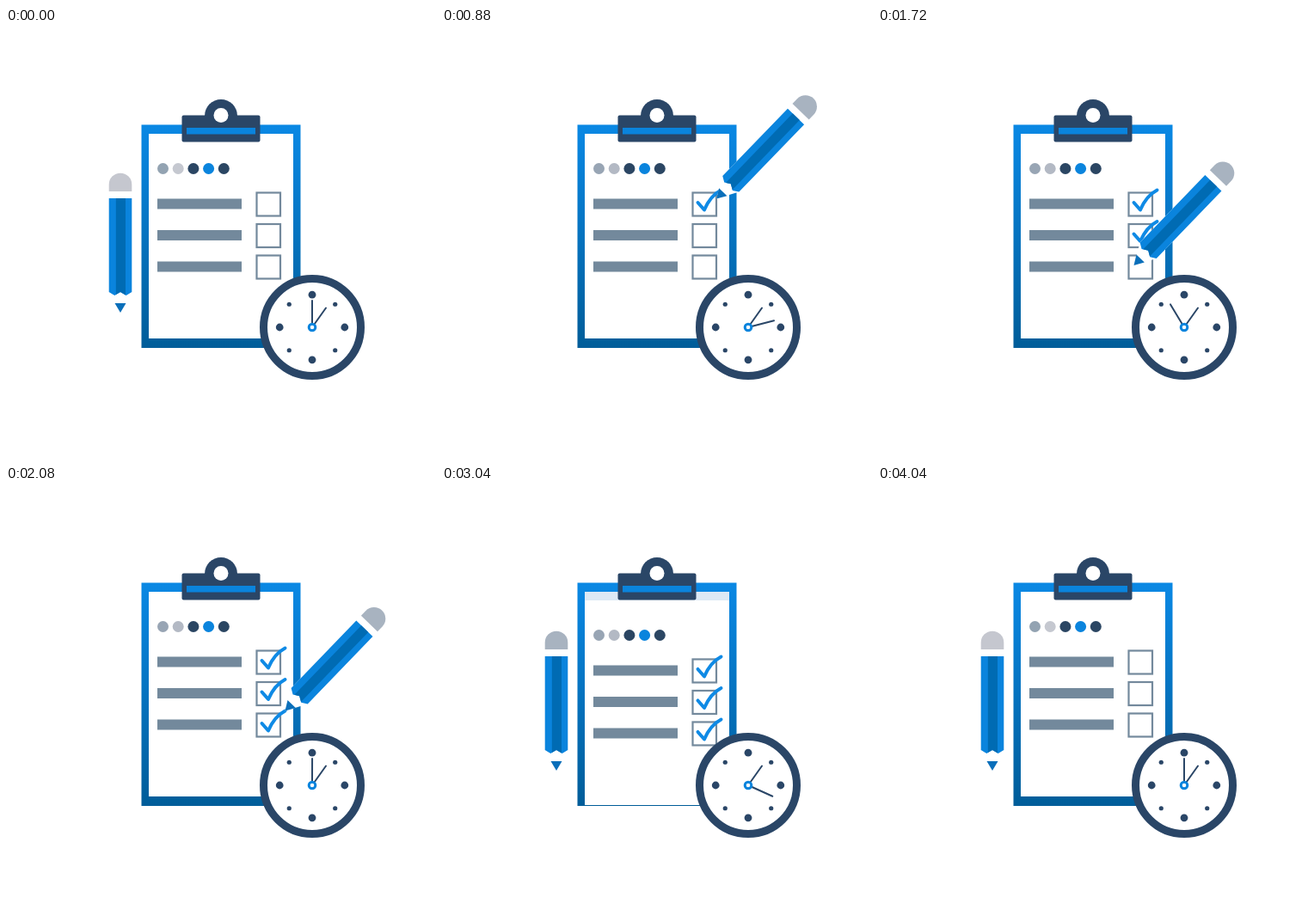
Recreate the animation shown at these times as an HTML page. Size 500 by 500 pixels, loop 5 s.

```html
<!DOCTYPE html>
<html lang="en">
<head>
<meta charset="utf-8">
<title>Checklist</title>
<style>
  html, body { margin: 0; width: 100%; height: 100%; overflow: hidden; background: #fff; }
  svg { display: block; width: 100vw; height: 100vh; }
</style>
</head>
<body>
<svg viewBox="0 0 500 500">
  <defs>
    <linearGradient id="boardFill" x1="0" y1="0" x2="0" y2="1">
      <stop offset="0" stop-color="#0a88e4"/>
      <stop offset=".2" stop-color="#0880d6"/>
      <stop offset="1" stop-color="#005d99"/>
    </linearGradient>
    <clipPath id="boardClip"><path d="M157 112H343V371H157Z"/></clipPath>
  </defs>

  <path d="M157.5 112.5H342.5V372H157.5Z" fill="url(#boardFill)"/>
  <path d="M166 123H334V361H166Z" fill="#dce9f5"/>
  <g clip-path="url(#boardClip)">
    <g id="freshPage"></g>
    <g id="page"></g>
  </g>

  <g fill="#2a4667">
    <circle cx="250" cy="102" r="19"/>
    <rect x="204.5" y="101.5" width="91" height="31" rx="2"/>
    <path d="M210 116H290V123.5H210Z" fill="#0a84dd"/>
    <circle cx="250" cy="101.5" r="8.5" fill="#fff"/>
  </g>

  <g id="clock" transform="translate(356 348)">
    <circle r="56.5" fill="#fff" stroke="#2a4667" stroke-width="9"/>
    <g id="marks" fill="#2a4667"></g>
    <g stroke="#2a4667" stroke-width="2" stroke-linecap="round">
      <path d="M0 0L16 -22.5"/>
      <path id="minute" d="M0 0V-31"/>
    </g>
    <circle r="3.8" fill="#fff" stroke="#0a84dd" stroke-width="3"/>
  </g>

  <!-- the pencil's origin is its point -->
  <g id="pencil">
    <path d="M-13.3 -141H13.3V-24L0 0L-13.3 -24Z" fill="#fff"/>
    <path id="eraser" d="M-13.3 -141V-149A13.3 13.3 0 0 1 13.3 -149V-141Z"/>
    <path d="M-13.3 -133H13.3V-24L6.7 -20L0 -24L-6.7 -20L-13.3 -24Z" fill="#0a84dd"/>
    <path d="M-5.2 -133H6V-20.5L0 -24L-5.2 -21Z" fill="#006bb3"/>
    <path d="M-6.5 -11H6.5L0 0Z" fill="#0a6fba"/>
  </g>
</svg>
<script>
const LOOP = 5000, STEP = 40, PITCH = 36.5, TILT = 44;
const REST = { x: 133, y: 331, tilt: 0 };
const WRITING = [[480, 800], [1080, 1400], [1720, 2040]];
const COLORS = {
  pale: { eraser: '#c5c7cf', dots: ['#93a3b2', '#c5c8d0', '#2b4663', '#0a84dd', '#2b4663'] },
  gray: { eraser: '#a8b3c0', dots: ['#98a5b4', '#b3b9c4', '#2b4663', '#0a84dd', '#2b4663'] },
  warm: { eraser: '#f8ad33', dots: ['#98aa85', '#f5b032', '#ee5f57', '#0a84dd', '#2b4663'] }
};

const $ = id => document.getElementById(id);
const clamp = v => Math.min(1, Math.max(0, v));
const span = (t, from, to) => clamp((t - from) / (to - from));
const smooth = p => p * p * (3 - 2 * p);
const mix = (a, b, p) => a + (b - a) * p;

// Bezier easing (.62, 0, .66, 1), solved by bisection.
function swing(p) {
  let low = 0, high = 1;
  for (let i = 0; i < 20; i++) {
    const u = (low + high) / 2, v = 1 - u;
    const x = 1.86 * u * v * v + 1.98 * u * u * v + u * u * u;
    if (x < p) low = u; else high = u;
  }
  return p <= 0 ? 0 : p >= 1 ? 1 : smooth(low);
}

function pageMarkup(checked) {
  let out = '<path d="M166 123H334V361H166Z" fill="#fff"/>';
  for (let i = 0; i < 5; i++) out += `<circle class="dot" cx="${182.5 + i * 17.7}" cy="163.5" r="6.5"/>`;
  for (let i = 0; i < 3; i++) {
    out += `<g transform="translate(0 ${i * PITCH})">
      <path d="M176 198.5H274V210.5H176Z" fill="#73899c"/>
      <rect x="291.5" y="191.5" width="27.5" height="27" fill="none" stroke="#73899c" stroke-width="2.2"/>
      ${checked ? '<path class="check" d="M297.5 203L305 211.5Q312 195 324.5 188.5" fill="none" stroke="#0f8ae5" stroke-width="4" stroke-linecap="round" stroke-linejoin="round"/>' : ''}
    </g>`;
  }
  return out;
}

$('freshPage').innerHTML = pageMarkup(false);
$('page').innerHTML = pageMarkup(true);
for (let i = 0; i < 8; i++) {
  const a = i * Math.PI / 4, big = i % 2 === 0;
  $('marks').innerHTML += `<circle cx="${37.8 * Math.cos(a)}" cy="${37.8 * Math.sin(a)}" r="${big ? 4.4 : 2.6}"/>`;
}
const checks = [...document.querySelectorAll('.check')];
const dots = [...document.querySelectorAll('.dot')];
const checkLength = checks[0].getTotalLength();

function onCheck(row, p) {
  const pt = checks[0].getPointAtLength(checkLength * p);
  return { x: pt.x, y: pt.y + row * PITCH, tilt: TILT };
}

function between(a, b, p) {
  return { x: mix(a.x, b.x, p), y: mix(a.y, b.y, p), tilt: mix(a.tilt, b.tilt, p) };
}

function pencilPose(t) {
  if (t < WRITING[0][0]) return between(REST, onCheck(0, 0), smooth(span(t, 40, 440)));
  for (let row = 0; row < 3; row++) {
    const [start, end] = WRITING[row];
    if (t < start) return between(onCheck(row - 1, 1), onCheck(row, 0), smooth(span(t, WRITING[row - 1][1], start)));
    if (t < end) return onCheck(row, smooth(span(t, start, end)));
  }
  return between(onCheck(2, 1), REST, smooth(span(t, 2240, 2760)));
}

function palette(t) {
  if (t >= 120 && t < 600) return COLORS.warm;
  return t >= 600 && t < 3360 ? COLORS.gray : COLORS.pale;
}

function draw(t) {
  const turn = t < 2040 ? span(t, 40, 2040) : span(t, 2040, 4040);
  $('minute').setAttribute('transform', `rotate(${360 * swing(turn)})`);

  const pose = pencilPose(t);
  $('pencil').setAttribute('transform', `translate(${pose.x} ${pose.y}) rotate(${pose.tilt})`);

  checks.forEach((check, row) => {
    const p = smooth(span(t, ...WRITING[row]));
    check.setAttribute('visibility', p > 0 ? 'visible' : 'hidden');
    check.setAttribute('stroke-dasharray', `${checkLength * p} 100`);
  });

  const slide = swing(span(t, 2940, 3440));
  $('page').setAttribute('transform', `translate(0 ${slide * 250})`);
  $('page').setAttribute('visibility', 'visible');
  $('page').style.display = slide < 1 ? '' : 'none';
  $('freshPage').setAttribute('opacity', span(t, 3040, 3360));

  const colors = palette(t);
  $('eraser').setAttribute('fill', colors.eraser);
  dots.forEach((dot, i) => dot.setAttribute('fill', colors.dots[i % 5]));
}

const began = performance.now();
function tick() {
  const t = (performance.now() - began) % LOOP;
  draw(Math.floor(t / STEP) * STEP);
  requestAnimationFrame(tick);
}
tick();
</script>
</body>
</html>
```
